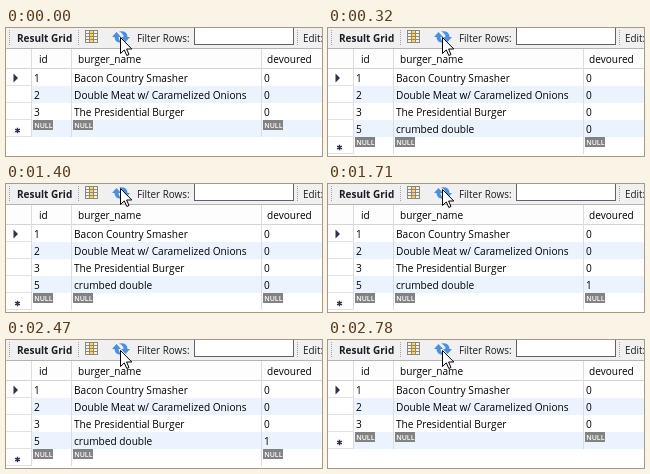
Write an HTML page that moves like this. It is 316 px wide and 128 px high and loops after 3160 ms.

```html
<!DOCTYPE html>
<html lang="en">
<head>
<meta charset="utf-8">
<title>Result grid refresh</title>
<style>
html, body { margin: 0; width: 100%; height: 100%; overflow: hidden; background: #fff; }
svg { display: block; width: 316px; height: 128px; }
text { font: 10.15px "Open Sans", "Noto Sans", sans-serif; fill: #000; white-space: pre; }
.tool { font-size: 9.9px; fill: #1c1c24; }
.head { font-size: 10.1px; }
.bold { font-size: 10px; font-weight: 700; fill: #1c1c24; }
.null { font-size: 7px; font-weight: 600; fill: #fff; }
.crisp { shape-rendering: crispEdges; }
</style>
</head>
<body>
<svg id="stage" viewBox="0 0 316 128">
  <rect width="316" height="128" fill="#fff"/>
  <g id="toolbar">
    <g class="crisp">
      <rect width="316" height="20" fill="#f0f0f0"/>
      <rect y="20" width="316" height="1" fill="#b4b4b4"/>
      <path d="M3.5 2V17M72.5 2V17M291.5 2V17" stroke="#a2a2a2" stroke-dasharray="1 1"/>
      <rect x="188.5" y="-2.5" width="99" height="19" fill="#fff" stroke="#5f6070"/>
    </g>
    <text class="bold" x="11" y="14">Result Grid</text>
    <text class="tool" x="131" y="14">Filter Rows:</text>
    <text class="tool" x="297" y="14">Edit:</text>
    <g class="crisp">
      <rect x="79" y="2" width="13" height="13" fill="#8f8778"/>
      <g id="tiles"></g>
    </g>
    <path id="arrow" d="M106 9L110.5 4L115 9H112.5Q112.5 12.5 117 14.5Q108.5 15.5 108.5 9Z" fill="#4a90e2"/>
    <use href="#arrow" transform="rotate(180 115 9)"/>
  </g>
  <g id="header">
    <rect class="crisp" y="21" width="316" height="19" fill="#fdfdfd"/>
    <path class="crisp" d="M0 40.5H316" stroke="#d5d5d5"/>
    <text class="head" x="33" y="35">id</text>
    <text class="head" x="72" y="35">burger_name</text>
    <text class="head" x="261" y="35">devoured</text>
  </g>
  <g id="grid"></g>
  <circle id="halo" cx="114" r="15" fill="#ffff60" fill-opacity=".45"/>
  <path id="cursor" d="M.5 .5V16.5L4.3 12.9L6.8 18.5L9 17.5L6.6 12H11.8Z" fill="#fff" stroke="#000"/>
</svg>
<script>
const LOOP = 3160, TOP = 41, ROW = 17;
const COLS = [27, 67, 257];
const ROWS = [
  [1, "Bacon Country Smasher", 0],
  [2, "Double Meat w/ Caramelized Onions", 0],
  [3, "The Presidential Burger", 0]
];
const ADDED = [5, "crumbed double"];
// [start, cursor tip y]
const MOVES = [[0, 9], [1400, 4], [1550, 5], [2470, 10]];
const CLICKS = [[150, 320], [1550, 1710], [2700, 2780]];
const byId = id => document.getElementById(id);
const rect = (x, y, w, h, fill) =>
  `<rect class="crisp" x="${x}" y="${y}" width="${w}" height="${h}" fill="${fill}"/>`;
const label = (x, y, s, cls = "") => `<text class="${cls}" x="${x}" y="${y}">${s}</text>`;

function drawTiles() {
  let out = "";
  for (let r = 0; r < 4; r++)
    for (let c = 0; c < 3; c++)
      out += rect(80 + c * 4, 3 + r * 3, 3, 2, c === 1 ? "#ffcf6b" : "#f4f2ee");
  byId("tiles").innerHTML = out;
}

function gridMarkup(rows) {
  let out = "";
  const end = TOP + (rows.length + 1) * ROW;
  for (let i = 0; i <= rows.length; i++) {
    const y = TOP + i * ROW;
    if (i % 2) out += rect(26, y, 290, ROW, "#ebf3fe");
    out += rect(0, y + ROW - 1, 25, 1, "#e2e2e2");
  }
  for (const x of [25, 65, 255]) out += rect(x, 21, 1, end - 21, "#dcdcdc");
  rows.forEach((row, i) => row.forEach((v, c) => {
    out += label(COLS[c] + 1, TOP + i * ROW + 13, v);
  }));

  const y = TOP + rows.length * ROW;
  for (const x of COLS)
    out += rect(x, y, 20, 10, "#828282") + label(x + 1.2, y + 7.6, "NULL", "null");

  out += `<path d="M7.5 45.5L12 50L7.5 54.5Z" fill="#30304c"/>`;
  const cy = y + 10.5;
  out += `<path d="M11.5 ${cy - 2.7}v5.4M9.1 ${cy - 1.4}l4.8 2.8M9.1 ${cy + 1.4}l4.8 -2.8" stroke="#30304c" stroke-width="1.4"/>`;
  return out;
}

let shown = "";
function render(t) {
  const added = t >= 320 && t < 2780;
  const devoured = t >= 1710 ? 1 : 0;
  const key = added ? "added" + devoured : "base";
  if (key !== shown) {
    byId("grid").innerHTML = gridMarkup(added ? [...ROWS, [...ADDED, devoured]] : ROWS);
    shown = key;
  }
  const y = MOVES.filter(m => m[0] <= t).pop()[1];
  byId("cursor").setAttribute("transform", `translate(114 ${y})`);
  byId("halo").setAttribute("cy", y);
  const clicked = CLICKS.some(([a, b]) => t >= a && t < b);
  byId("halo").setAttribute("visibility", clicked ? "visible" : "hidden");
}

drawTiles();
const start = performance.now();
function tick() {
  render((performance.now() - start) % LOOP);
  requestAnimationFrame(tick);
}
tick();
</script>
</body>
</html>
```
